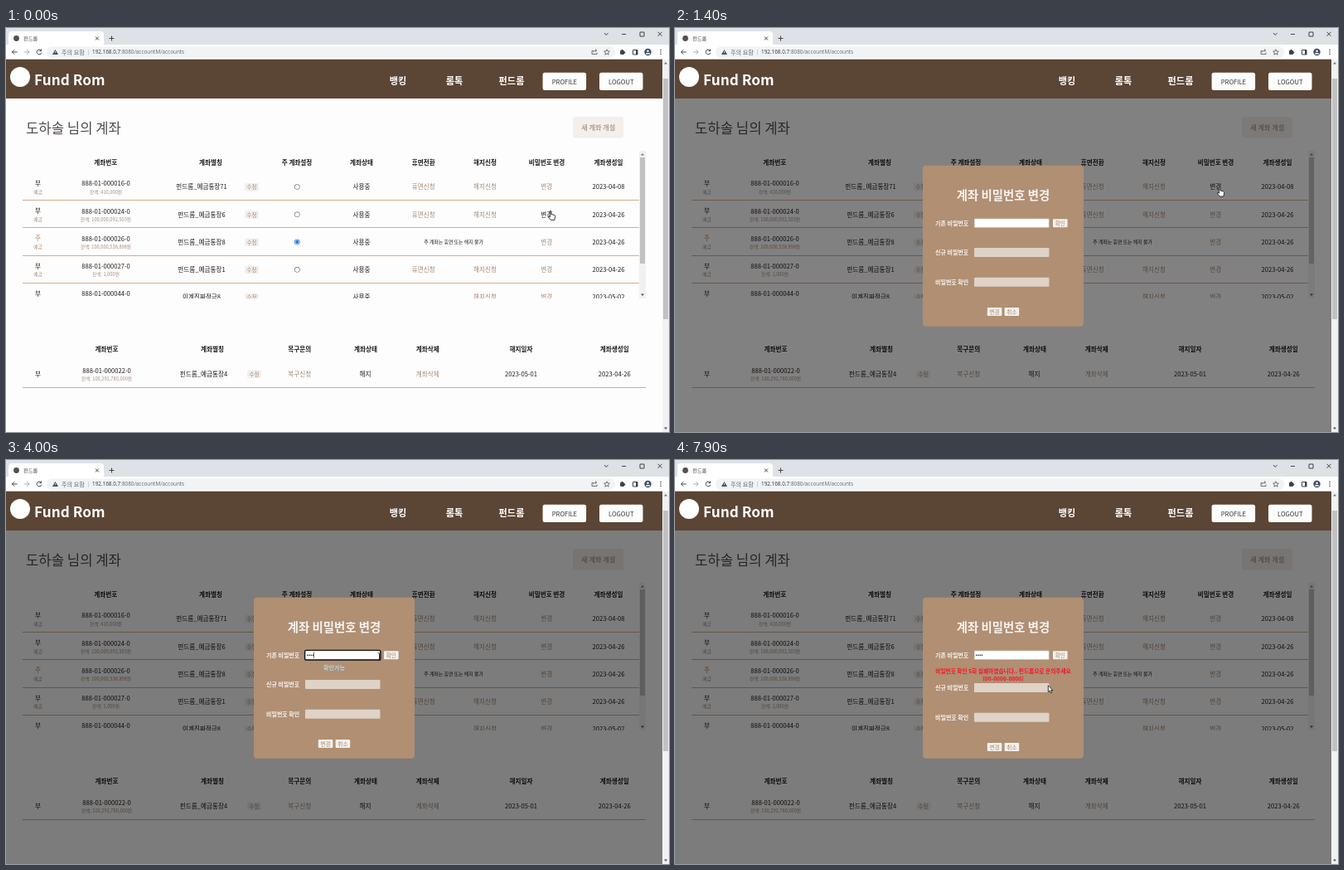
Recreate the animation shown at these times as an HTML page with a canvas. Size 800x487 px, loop 8000 ms.

```html
<!DOCTYPE html>
<html lang="ko">
<head>
<meta charset="utf-8">
<style>
  html, body { margin: 0; width: 100%; height: 100%; overflow: hidden; background: #fff; }
  canvas { display: block; }
</style>
</head>
<body>
<canvas id="stage" width="800" height="487"></canvas>
<script>
const ctx = document.getElementById('stage').getContext('2d');
const FONT = '"Noto Sans CJK KR", "Noto Sans", sans-serif';
const INK = '#1c1a19', TAN = '#a38b76', LINE = '#d0ae8c', BRAND = '펀드롬';
const LOOP = 8000;

function text(str, x, y, { size = 7.6, color = INK, weight = 400, align = 'center', font = FONT } = {}) {
  ctx.font = `${weight} ${size}px ${font}`;
  ctx.fillStyle = color;
  ctx.textAlign = align;
  ctx.textBaseline = 'middle';
  ctx.fillText(str, x, y);
}

function box(x, y, w, h, color, radius = 0) {
  ctx.fillStyle = color;
  ctx.beginPath();
  ctx.roundRect(x, y, w, h, radius);
  ctx.fill();
}

function outline(x, y, w, h, color, width, radius = 1) {
  ctx.strokeStyle = color;
  ctx.lineWidth = width;
  ctx.beginPath();
  ctx.roundRect(x, y, w, h, radius);
  ctx.stroke();
}

function disc(x, y, r, color) {
  ctx.fillStyle = color;
  ctx.beginPath();
  ctx.arc(x, y, r, 0, 7);
  ctx.fill();
}

function stroke(path, color = '#444', width = 1) {
  ctx.strokeStyle = color;
  ctx.lineWidth = width;
  ctx.stroke(new Path2D(path));
}

function fillPath(path, color) {
  ctx.fillStyle = color;
  ctx.fill(new Path2D(path));
}

// Linear interpolation through [time, ...values] keys
function at(keys, t) {
  let i = keys.findIndex(k => k[0] > t);
  if (i < 0) return keys.at(-1).slice(1);
  if (i === 0) return keys[0].slice(1);
  const [a, b] = [keys[i - 1], keys[i]];
  const p = (t - a[0]) / (b[0] - a[0]);
  return a.slice(1).map((v, j) => v + (b[j + 1] - v) * p);
}

function scrollbar(x, top, bottom, thumbTop, thumbBottom) {
  box(x, top, 8, bottom - top, '#f1f1f1');
  box(x + 1, thumbTop, 6, thumbBottom - thumbTop, '#c1c1c1');
  fillPath(`M${x + 2} ${top + 5.5}h4l-2 -2.5z`, '#777');
  fillPath(`M${x + 2} ${bottom - 5.5}h4l-2 2.5z`, '#555');
}

function browserBar() {
  box(0, 0, 800, 21, '#dee1e6');
  box(3, 4, 115, 20, '#fff', 4);
  box(0, 20, 800, 17.5, '#fff');
  disc(12.5, 12.5, 3.4, '#4d5156');
  text(BRAND, 21, 12.3, { size: 6.2, align: 'left', color: '#444' });
  stroke('M108 10.5l4 4m0 -4l-4 4M127.5 9.5v6m-3 -3h6');
  stroke('M722 6l2.3 2.5l2.3 -2.5M743 7.5h5M765 5h5v5h-5zM786.5 4.8l5 5m0 -5l-5 5', '#333', .9);
  stroke('M13.5 29h-6m2.7 -2.8l-2.8 2.8l2.8 2.8M42.4 27.3a2.9 2.9 0 1 0 .4 2.6m-.2 -4.4v2.2h-2.2');
  stroke('M22 29h6m-2.7 -2.8l2.8 2.8l-2.8 2.8', '#aaa');
  box(49, 22.5, 686, 13.5, '#f1f3f4', 7);
  fillPath('M59.5 26l3.6 6h-7.2z', '#4d5156');
  stroke('M59.5 28v2', '#fff', .7);
  stroke('M99.5 26v6.5', '#bbb', .7);
  const small = { size: 6.35, align: 'left', color: '#3c4043', font: '"Noto Sans", sans-serif' };
  text('주의 요함', 67, 29, { size: 7.1, align: 'left', color: '#5f6368' });
  text('192.168.0.7', 104, 29.3, small);
  text(':8080/accountM/accounts', 138.2, 29.3, { ...small, color: '#6b6f74' });
  stroke('M709 27.5h-2v4h6v-2M708.5 29.5q.5 -2.5 4 -2.5m-1.5 -1.5l1.7 1.5l-1.7 1.5', '#555', .8);
  stroke('M725 25.8l1 2.2l2.4 .2l-1.8 1.6l.6 2.4l-2.2 -1.3l-2.2 1.3l.6 -2.4l-1.8 -1.6l2.4 -.2z', '#555', .8);
  box(741, 27, 5, 5, '#444', 1);
  disc(746, 29.5, 1.2, '#444');
  disc(743.5, 27, 1.2, '#444');
  stroke('M756.5 26.5h5.5v5.5h-5.5z', '#444');
  box(760, 26.5, 2, 5.5, '#444');
  disc(774.5, 29, 4.2, '#3f4c62');
  disc(774.5, 27.8, 1.4, '#dfe5ee');
  box(772, 30, 5, 1.8, '#dfe5ee', 1);
  [26.5, 29, 31.5].forEach(y => disc(790, y, .8, '#444'));
}

function siteHeader() {
  box(0, 37.5, 792, 47.5, '#5b4535');
  disc(17, 59, 12, '#fff');
  text('Fund Rom', 34, 62.2, { size: 17.2, weight: 700, align: 'left', color: '#fff' });
  const menu = { size: 11.2, weight: 700, color: '#fff' };
  text('뱅킹', 473, 63.3, menu);
  text('롬톡', 541, 63.3, menu);
  text(BRAND, 610, 63.3, menu);
  [['PROFILE', 647.6], ['LOGOUT', 716]].forEach(([label, x]) => {
    box(x, 53.7, 52.5, 21.4, '#fdfdfd', 2.5);
    text(label, x + 26.3, 65, { size: 7.6, color: '#333' });
  });
}

function headings(labels, centers, y) {
  labels.split('|').forEach((label, i) => text(label, centers[i], y, { weight: 700 }));
}

function accountCell(number, balance, x, y) {
  text(number, x, y - 4.1);
  text(`잔액: ${balance}원`, x, y + 5.8, { size: 5.7, color: TAN });
}

function editButton(x, y) {
  box(x - 8.5, y - 4.5, 17, 9.5, '#f2efec', 2);
  text('수정', x, y + .3, { size: 6.5, color: TAN });
}

const MAIN_COLS = [120.3, 247, 351, 429, 503.7, 578, 652.5, 727];
const ROWS = [
  ['000016', '410,000', BRAND + '_예금통장71', '2023-04-08'],
  ['000024', '100,000,092,503', BRAND + '_예금통장6', '2023-04-26'],
  ['000026', '100,000,538,898', BRAND + '_예금통장8', '2023-04-26'],
  ['000027', '1,000', BRAND + '_예금통장1', '2023-04-26'],
  ['000044', '0', '이계진짜적금8', '2023-05-02'],
];

function accountTable(hoverRow) {
  headings('계좌번호|계좌별칭|주 계좌설정|계좌상태|휴면전환|해지신청|비밀번호 변경|계좌생성일', MAIN_COLS, 162);
  ctx.save();
  ctx.beginPath();
  ctx.rect(20, 148, 752, 178);
  ctx.clip();
  ROWS.forEach(([id, balance, alias, date], i) => {
    const y = 191.6 + i * 33.25, main = i === 2, last = i === 4;
    text(main ? '주' : '부', 38.5, y - 4.5, { color: main ? '#b8834a' : INK });
    text('예금', 38.5, y + 5.8, { size: 5.7, color: TAN });
    accountCell(`888-01-${id}-0`, balance, 120.5, y);
    text(alias, 236, y);
    editButton(296.5, y);
    if (!last) {
      disc(351.3, y, 3.3, main ? '#1a73e8' : '#767676');
      disc(351.3, y, 2.6, '#fff');
      if (main) disc(351.3, y, 2, '#1a73e8');
    }
    text('사용중', 429, y);
    if (main) text('주 계좌는 휴면 또는 해지 불가', 540, y, { size: 5.9 });
    else {
      if (!last) text('휴면신청', 503.7, y, { color: TAN });
      text('해지신청', 578, y, { color: TAN });
    }
    text('변경', 652.3, y, { color: i === hoverRow ? INK : TAN });
    text(date, 727, y);
    box(20, Math.round(y + 15.6), 744, 1, LINE);
  });
  ctx.restore();
  scrollbar(764, 148, 326, 156, 284);
}

function closedTable() {
  headings('계좌번호|계좌별칭|복구문의|계좌상태|계좌삭제|해지일자|계좌생성일',
    [121.5, 249, 354.3, 434, 508.7, 621.5, 734.3], 387);
  const y = 417;
  text('부', 38.5, y);
  accountCell('888-01-000022-0', '100,291,780,000', 121.5, y);
  text(BRAND + '_예금통장4', 238.5, y);
  editButton(299.5, y);
  text('복구신청', 354.3, y, { color: TAN });
  text('해지', 433.5, y);
  text('계좌삭제', 508.7, y, { color: TAN });
  text('2023-05-01', 621.5, y);
  text('2023-04-26', 734.3, y);
  box(20, 433, 752, 1, LINE);
}

function page(hoverRow) {
  box(0, 37.5, 800, 450, '#fefdfe');
  siteHeader();
  text('도하솔 님의 계좌', 24, 121, { size: 16.7, weight: 300, align: 'left', color: '#514c49' });
  box(684, 107, 61, 25.5, '#f2efec', 2.5);
  text('새 계좌 개설', 714.7, 120, { size: 8.1, weight: 700, color: '#b3a18f' });
  accountTable(hoverRow);
  closedTable();
  scrollbar(792, 38, 487, 61, 351);
}

function formButton(label, x, y) {
  box(x - 8.8, y - 5, 17.6, 10, '#f5f0ec', 1);
  text(label, x, y + .2, { size: 6.6, color: '#a08a76' });
}

const TYPED = [3100, 3200, 3400, 3800];
const FOCUS = 2300, CONFIRM = 5900, REPLY = 6000;

function passwordField(t) {
  const dots = TYPED.filter(k => t >= k).length;
  const focused = t >= FOCUS && t < CONFIRM;
  box(361, 229.7, 90.5, 11, '#fff', 1);
  if (focused) outline(360.6, 229.4, 91.3, 11.6, '#111', 1.4, 1.5);
  else outline(361.2, 229.9, 90.1, 10.6, '#a2968d', .5);
  for (let i = 0; i < dots; i++) disc(363.7 + i * 2.25, 235.3, .8, '#111');
  const since = t - Math.max(FOCUS, ...TYPED.filter(k => t >= k));
  if (focused && since % 1000 < 500) box(362.4 + dots * 2.2, 231.5, .6, 7.5, '#111');
  return dots;
}

function modal(t) {
  const [scale, r, g, b, alpha] = at([[1300, 1.031, 215, 176, 144, .72], [1400, 1, 176, 143, 115, 1]], t);
  const failed = t >= REPLY, shift = failed ? 4 : 0;
  const label = { size: 7, weight: 700, align: 'left', color: '#f8f5f3' };
  ctx.save();
  ctx.translate(396, 263);
  ctx.scale(scale, scale);
  ctx.translate(-396, -263);
  box(299, 165.8, 194, 194, `rgba(${r},${g},${b},${alpha})`, 4);
  text('계좌 비밀번호 변경', 396, 201.4, { size: 14.4, weight: 700, color: '#f6f3f1' });
  text('기존 비밀번호', 314, 235, label);
  const dots = passwordField(t);
  formButton('확인', 464.8, 235.2);
  [['신규 비밀번호', 270.6], ['비밀번호 확인', 306.2]].forEach(([name, y]) => {
    text(name, 314, y + shift - .2, label);
    box(361, y + shift - 5.5, 90.5, 11, 'rgba(255,255,255,.6)', 1);
  });
  formButton('변경', 385.6, 342 + shift);
  formButton('취소', 406.4, 342 + shift);

  const error = { size: 6.7, weight: 700, color: '#f5142a' };
  if (failed) {
    text(`비밀번호 확인 5회 실패하였습니다.. ${BRAND}으로 문의주세요`, 396, 254.4, error);
    text('(00-0000-0000)', 396, 263.8, error);
  } else if (dots === 4) {
    text('확인가능', 396, 250.4, { size: 7, weight: 700, color: '#add8e6' });
  } else if (dots) {
    text('4자리 숫자를 입력해주세요', 396, 250.4, { ...error, size: 7 });
  }
  ctx.restore();
}

const POINTER = [
  [0, 657, 220], [200, 657, 204], [300, 657, 196], [400, 657, 196], [500, 657, 191.5],
  [1400, 657, 191.5], [2100, 465, 221], [2500, 443, 237], [3700, 443, 237], [4100, 453, 237],
  [4700, 453, 237], [4800, 462, 238], [4900, 453, 237], [5700, 453, 237], [5800, 463, 236],
  [7100, 463, 236], [7500, 455, 289], [7900, 450.3, 271.8],
];

function pointer(x, y, kind) {
  const shapes = {
    hand: 'M-.8 .8Q0 -.4 .8 .8V4.4l4.2 1.2q.9 .3 .7 1.5l-.8 4.4h-4.6l-3.2 -4q.3 -1 1.4 -.4l1 .8z',
    arrow: 'M0 0V8l1.8 -1.7l1.3 2.8l1.3 -.6l-1.2 -2.7h2.5z',
  };
  ctx.save();
  ctx.translate(x, y);
  if (kind === 'beam') {
    stroke('M-1.8 -4.5q1.8 0 1.8 1v7q0 1 -1.8 1M1.8 -4.5q-1.8 0 -1.8 1v7q0 1 1.8 1', '#222', .8);
  } else {
    fillPath(shapes[kind], '#fff');
    stroke(shapes[kind], '#111', .8);
  }
  ctx.restore();
}

function draw(t) {
  const [x, y] = at(POINTER, t);
  const open = t >= 1300;
  page(t > 1400 ? -1 : y > 207 ? 1 : 0);
  browserBar();
  if (open) {
    const [shade] = at([[1300, .35], [1400, .49], [1500, .51]], t);
    box(0, 85, 792, 402, `rgba(0,0,0,${shade})`);
    modal(t);
  }
  const inField = open && x > 358 && x < 455 && y > 229 && y < 242;
  pointer(x, y, t <= 1400 ? 'hand' : inField ? 'beam' : 'arrow');
}

function tick(now) {
  draw(Math.floor(now % LOOP / 100) * 100);
  requestAnimationFrame(tick);
}
requestAnimationFrame(tick);
</script>
</body>
</html>
```
